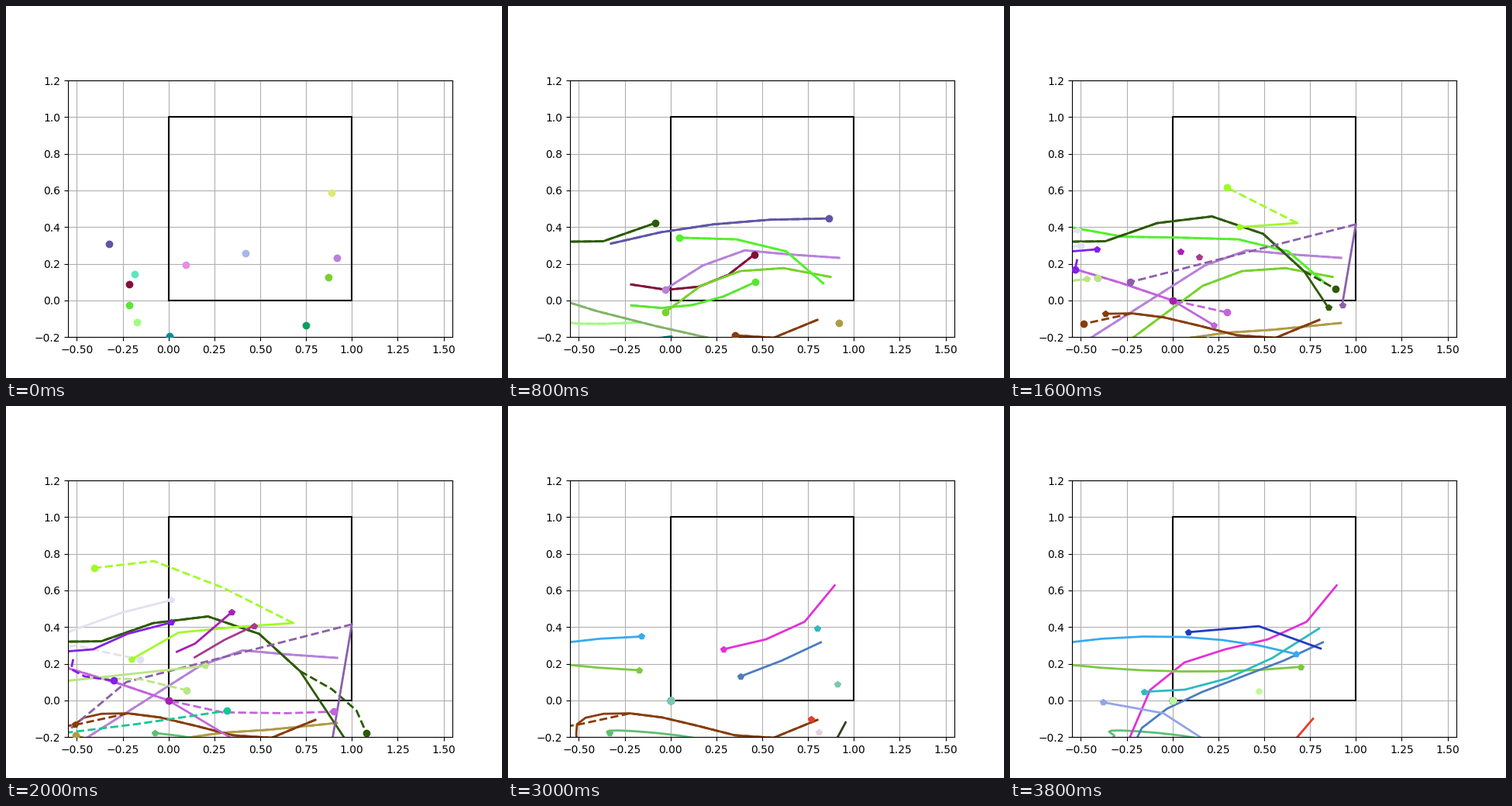
A matplotlib script for the animation above (4 s loop, 640x480 px).

```python
import numpy as np
import matplotlib.pyplot as plt
from matplotlib.animation import FuncAnimation

FRAMES, STEP = 20, 200
W, H, DPI = 640, 480, 100

fig = plt.figure(figsize=(W / DPI, H / DPI), dpi=DPI, facecolor="white")
fig.subplots_adjust(left=0.125, right=0.9, bottom=0.11, top=0.8)
ax = fig.add_subplot()
box = ax.get_position()
half = 0.7 * (box.width * W) / (box.height * H)   # equal scale on both axes
ax.set_xlim(0.5 - half, 0.5 + half)
ax.set_ylim(-0.2, 1.2)
ax.grid(True)
ax.plot([0, 1, 1, 0, 0], [0, 0, 1, 1, 0], "k", lw=1.5)

PARKED = np.zeros((FRAMES, 2))
tracks = []


def route(steps, *keys):
    """Polynomial through evenly timed keys, then straight on at the last speed."""
    n = len(keys)
    coef = np.polyfit(np.linspace(0, steps, n), np.array(keys), n - 1)
    pts = list(np.vander(np.arange(steps + 1), n) @ coef)
    while len(pts) < FRAMES:
        pts.append(2 * pts[-1] - pts[-2] if steps else pts[-1])
    return np.array(pts)


def track(color, start, end, seen, guess=None, fork=0):
    """Solid observed trail and dashed estimate, which leaves it at step `fork`."""
    guess = seen if guess is None else np.vstack([seen[:fork], guess])
    parts = []
    for pts, style, mark in ((seen, "-", "p"), (guess, "--", "o")):
        line, = ax.plot([], [], style, color=color, lw=2)
        dot, = ax.plot([], [], mark, color=color, ms=6, zorder=3)
        parts.append((pts, line, dot))
    tracks.append((start, end, parts))


# Detections lost at once
track("#5ce6be", 0, 1, route(0, (-.185, .145)))
track("#e68ee6", 0, 1, route(0, (.095, .192)))
track("#aab6e6", 0, 1, route(0, (.42, .257)))
track("#dcec72", 0, 1, route(0, (.89, .585)))
track("#08a05e", 0, 1, route(0, (.75, -.137)))

# First wave: the estimate follows the observation
track("#5f55a5", 0, 5, route(4, (-.325, .31), (.235, .415), (.865, .447)))
track("#82103a", 0, 5, route(4, (-.215, .087), (.155, .075), (.457, .25)))
track("#5ae632", 0, 5, route(4, (-.215, -.027), (.12, -.025), (.463, .1)))
track("#a2fa84", 0, 6, route(4, (-.17, -.12), (-.5, -.127), (-.62, -.1)))
track("#0a8c96", 0, 5, route(4, (.005, -.197), (-.5, -.26)))
track("#82b469", 1, 6, route(4, (-.62, .01), (-.08, -.14), (.9, -.35)))
track("#b682da", 0, 11, route(4, (.92, .232), (.66, .25), (.405, .273),
                              (.175, .19), (-.03, .06)))
track("#78d22d", 0, 10, route(4, (.873, .128), (.38, .16), (-.03, -.065)))
track("#55f02d", 1, 10, route(5, (.833, .093), (.455, .32), (-.06, .342), (-.56, .4)))
track("#b09b46", 4, 11, route(6, (.919, -.123), (.41, -.168), (.09, -.205),
                              (-.2, -.26), (-.505, -.19)))
track("#2d5a05", 2, 11, route(6, (-.6, .32), (-.23, .372), (.215, .458),
                              (.615, .27), (.85, -.04)),
      route(2, (.89, .062), (1.025, -.055), (1.08, -.18)), fork=6)
track("#873c0a", 2, 19, route(10, (.801, -.106), (.35, -.19), (-.045, -.093),
                              (-.365, -.073), (-.51, -.13), (-.505, -.28)),
      route(1, (-.485, -.128), (-.735, -.17)), fork=6)

# Second wave: the estimate drifts away
track("#c364dc", 5, 15, route(3, (-.58, .185), (-.28, .095), (0, 0), (.225, -.135)),
      route(5, (.295, -.065), (.995, -.052), (1.128, .045)), fork=3)
track("#8c5faa", 7, 11, route(1, (1, .415), (.925, -.027)),
      route(1, (-.23, .1), (-.53, -.15)), fork=1)
track("#e1e1f0", 7, 15, route(6, (-.79, .26), (.015, .547), (.8, .58)),
      route(5, (-.5, .3), (-.03, .2), (.815, .055)), fork=1)
track("#b9e682", 7, 12, route(3, (-.8, .08), (.2, .188)),
      route(2, (-.41, .122), (-.15, .115), (.1, .055)), fork=1)
track("#a0fa28", 7, 15, route(3, (.68, .422), (.365, .4), (.055, .37), (-.2, .225)),
      route(2, (.297, .615), (-.08, .76), (-.405, .722)), fork=1)
track("#8220e6", 7, 15, route(6, (-.62, .262), (-.32, .32), (.015, .425),
                              (.45, .44), (.725, .575)),
      route(6, (-.52, .225), (-.3, .108), (.68, .133)))
track("#14c891", 8, 15, route(0, (-1, -.5)),
      route(5, (-.75, -.2), (.53, -.02), (1.27, .168)))

# Later arrivals: the estimate waits at the origin
track("#5fbe73", 8, 20, route(10, (.19, -.215), (-.14, -.172), (-.333, -.165),
                              (-.325, -.185), (-.39, -.215)), PARKED)
track("#a53c8c", 8, 14, route(5, (.143, .235), (.545, .437), (.928, .515)), PARKED)
track("#aa1eb4", 8, 12, route(2, (.045, .265), (.145, .31), (.343, .48)), PARKED)
track("#e132d7", 12, 20, route(6, (.895, .627), (.52, .333), (.065, .207),
                               (-.245, -.23)), PARKED)
track("#2d411e", 13, 19, route(1, (.955, -.12), (.89, -.24)), PARKED)
track("#37aaf0", 13, 20, route(6, (-.62, .31), (.06, .346), (.675, .253)), PARKED)
track("#7dc841", 13, 20, route(6, (-.62, .2), (.05, .158), (.7, .183)), PARKED)
track("#4b7dbe", 13, 20, route(6, (.82, .317), (.38, .13), (-.03, -.045),
                               (-.23, -.28)), PARKED)
track("#e63c28", 15, 20, route(1, (.766, -.1), (.655, -.23)), PARKED)
track("#e6d2dc", 15, 17, route(1, (.81, -.175), (.75, -.24)), PARKED)
track("#2db9c3", 15, 20, route(4, (.799, .392), (.3, .12), (-.155, .047)), PARKED)
track("#78c8b4", 15, 16, route(0, (.91, .09)), PARKED)
track("#233cbe", 17, 20, route(2, (.808, .283), (.47, .405), (.085, .372)), PARKED)
track("#91a5e6", 17, 20, route(2, (.205, -.235), (-.05, -.07), (-.38, -.01)), PARKED)
track("#befa96", 19, 20, route(0, (.47, .05)), PARKED)


def draw(n):
    for start, end, parts in tracks:
        shown = n - start + 1 if start <= n < end else 0
        for pts, line, dot in parts:
            trail = pts[:shown]
            line.set_data(trail[:, 0], trail[:, 1])
            dot.set_data(trail[-1:, 0], trail[-1:, 1])
    return []


anim = FuncAnimation(fig, draw, frames=FRAMES, interval=STEP, repeat=True, repeat_delay=0)
plt.show()
```
